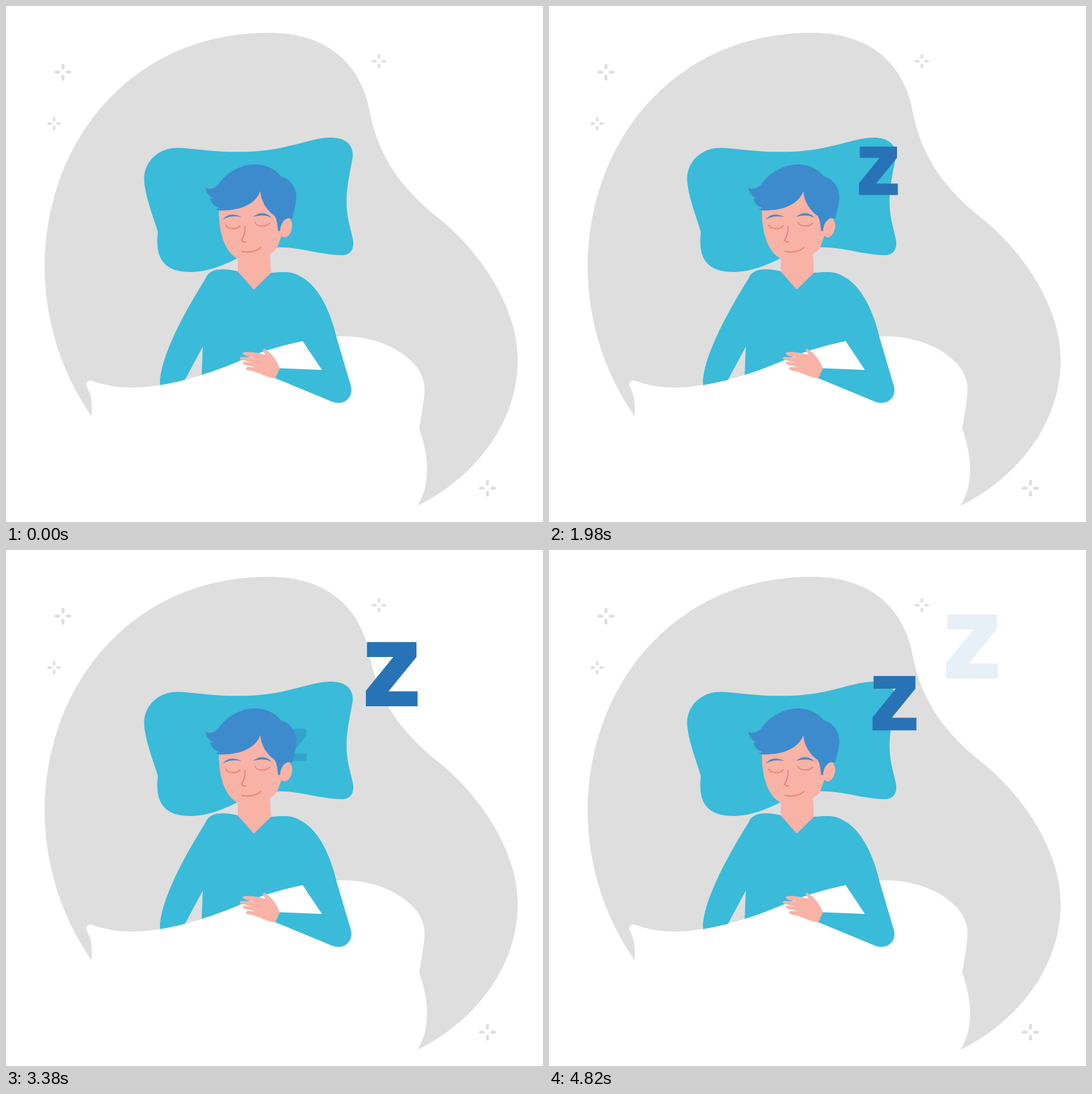
Animation of 764x733 px, one loop 4.88 s. Source, as an HTML page:

```html
<!DOCTYPE html>
<html lang="en">
<head>
<meta charset="utf-8">
<title>Sleeping</title>
<style>
  html, body { margin: 0; width: 100%; height: 100%; overflow: hidden; background: #fff; }
  svg { display: block; width: 100%; height: 100%; }
  .gray { fill: #dedede; }
  .teal { fill: #39bbd9; }
  .skin { fill: #f9b2a6; }
  .hair { fill: #3d8bcd; }
  .line { fill: none; stroke: #e37f6d; stroke-width: 1.4; stroke-linecap: round; stroke-linejoin: round; }
  .spark { stroke: #dedede; stroke-linecap: round; }
  .z { fill: #2873b5; }
</style>
</head>
<body>
<svg viewBox="0 0 764 733" xmlns="http://www.w3.org/2000/svg">
  <defs>
    <path id="spark" d="M-10 0H-6M6 0H10M0-10V-6M0 6V10"/>
    <path id="zed" d="M-35.2-45.6H35.2V-24.5L-4.6 24.2H36.8V45.6H-36.8V23.5L2.2-24.4H-35.2Z"/>
  </defs>

  <path class="gray" d="M122 583C82 527 55 450 55 370C55 197 175 38 374 38C460 38 505 85 517 148C532 228 578 272 620 305C672 348 728 425 728 502C728 595 665 670 586 710Z"/>

  <g class="spark">
    <use href="#spark" transform="translate(81 94)" stroke-width="4.2"/>
    <use href="#spark" transform="translate(68.5 167) scale(.8)" stroke-width="4.2"/>
    <use href="#spark" transform="translate(530.5 78.5) scale(.86)" stroke-width="4"/>
    <use href="#spark" transform="translate(685 685)" stroke-width="4.2"/>
  </g>

  <!-- pillow -->
  <path class="teal" d="M245 201.5C218 201 196 220 196.500 247C198 272 210 300 216 321C213 350 217 378 264 378C315 376 340 343 386 343C410 341 450 354 478 354C490 354 495 345 494 335C492 320 485 305 484.500 280C484 255 492 225 493.500 213C494 195 480 186 460 187C430 188 400 205 345 207C300 209 270 202 245 201.500Z"/>

  <g id="zs"></g>

  <!-- body -->
  <path class="teal" d="M330 377C315 373 300 373 293 377C287 380 286 383 284 387C262 422 222 490 219 532V546H248L254 532L280 484L278 535H440L470 470C462 435 445 398 420 385C410 377 395 377 377 379L352 390Z"/>
  <path class="skin" d="M330 345V377.500L352.500 403L377 379L375 345Z"/>

  <!-- head -->
  <ellipse class="skin" cx="398" cy="314.500" rx="9" ry="14.300" transform="rotate(10 398 314.500)"/>
  <path class="skin" d="M303 280C301 330 315 353 333 361C352 366 374 358 386 343L392 326V275L362 255Z"/>
  <path class="hair" d="M284 258C290 262 299 258 303 252C315 236 335 224 357 225C375 226 387 236 391 242C405 246 413 258 413 271C413 280 410 291 407 302C400 299 393 305 391 313L389.500 320L387 319C386 308 385 302 382 298C370 290 362 275 362 263C355 281 335 291 303 290.500L297 288C300 288.500 302 288 303 286.500C296 284 291 279 291 273L298 274C290 272 284 266 284 258Z"/>
  <g class="hair">
    <path d="M308.500 304C313 296 324 293.500 335 300C326 298 316 298 308.500 304Z"/>
    <path d="M352 299.500C360 292 371 292.500 378 301C370 296.500 361 296.500 352 299.500Z"/>
  </g>
  <g class="line">
    <path d="M312.500 311C316 317.500 328 318 333 312.500"/>
    <path d="M354 307.500C358 314 370 314 375 308.500"/>
    <path d="M340 313C340.500 321 339 327 335 332.500Q337 335.500 341 335.500"/>
    <path d="M335.500 348.700C345 350.500 356 349 362.500 343"/>
  </g>

  <!-- blanket -->
  <path fill="#fff" d="M122 583C122.500 560 121 552 115 541C112 535 118 530 124 533C150 542 180 545 219 538.500C260 532 300 518 335 503C365 490 390 483 422 476C440 472 455 470 471 469.500C540 466 597 505 595.500 545C595 560 592 575 588 600C598 630 601 655 598 672C597 688 592 697 586 710L584 722H110Z"/>

  <!-- arm and hand -->
  <path class="teal" d="M422 476L449.500 517L388 514.500L382.500 528.500L465 562.500C482 568 494 556 491 541L470 470C462 440 448 400 420 385L405 440Z"/>
  <path class="skin" d="M389.500 515C386 505 378 492 367 487C364 487 366 491 370 496C362 493 350 491 340 491.500C335 492 336 496 342 497L353 498.800L335 498.500C331 499 332 502 336 503L351 506L339 505.500C335 506 336 509 341 510L355 513L344 512.700C339 514 341 517 347 518C360 520 370 528 383 529Z"/>
</svg>

<script>
const LOOP = 4880;
const FULL = 73.5;

// age, x, y, width
const PATH = [
  [0, 355.4, 315.4, 20.4],
  [3020, 528.1, 191.5, FULL],
  [3430, 551.6, 174.4, FULL],
  [LOOP, 604, 135.5, FULL]
];

const clamp = v => Math.min(1, Math.max(0, v));

function pose(age) {
  const i = Math.max(1, PATH.findIndex(k => k[0] >= age));
  const a = PATH[i - 1], b = PATH[i];
  const p = (age - a[0]) / (b[0] - a[0]);
  return a.map((v, n) => v + (b[n] - v) * p);
}

const layer = document.getElementById('zs');
const letters = [0, LOOP / 2].map(start => {
  const el = document.createElementNS('http://www.w3.org/2000/svg', 'use');
  el.setAttribute('href', '#zed');
  el.setAttribute('class', 'z');
  layer.append(el);
  return { el, start };
});

function draw(now) {
  const t = now % LOOP;
  for (const { el, start } of letters) {
    const age = Math.max(0, t - start);
    const [, x, y, w] = pose(age);
    const fade = clamp((age - 400) / 1600) * clamp((4987 - age) / 1514);
    el.setAttribute('transform', `translate(${x} ${y}) scale(${w / FULL})`);
    el.setAttribute('opacity', fade);
  }
}

function tick() {
  draw(performance.now());
  requestAnimationFrame(tick);
}
tick();
</script>
</body>
</html>
```
